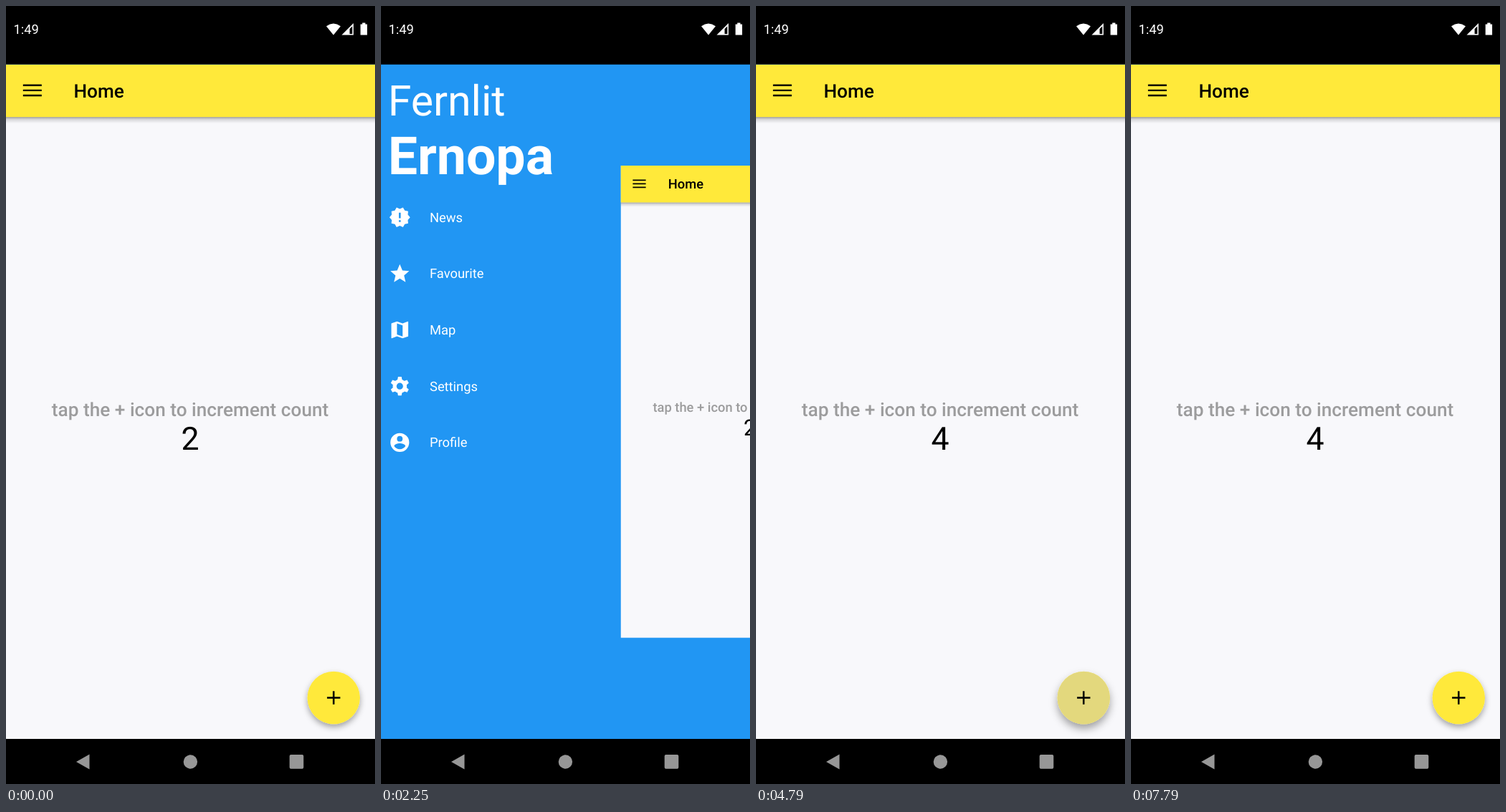
An HTML page that plays this animation: 515x1087 px, repeating every 7.96 s.

```html
<!DOCTYPE html>
<html lang="en">
<head>
<meta charset="utf-8">
<title>Drawer demo</title>
<style>
  html, body { margin: 0; width: 100%; height: 100%; overflow: hidden; background: #000; }
  svg { display: block; width: 100vw; height: 100vh; }
  text { font-family: Roboto, sans-serif; text-rendering: geometricPrecision; }
  .medium { font-weight: 500; font-size: 26.2px; }
  .small { font-size: 18.35px; fill: #fff; }
</style>
</head>
<body>
<svg viewBox="0 0 515 1087" xmlns="http://www.w3.org/2000/svg">
  <defs>
    <linearGradient id="barShade" x2="0" y2="1">
      <stop offset="0" stop-opacity=".36"/>
      <stop offset=".4" stop-opacity=".13"/>
      <stop offset="1" stop-opacity="0"/>
    </linearGradient>
    <filter id="lift" x="-40%" y="-40%" width="180%" height="190%">
      <feDropShadow id="shadow" dx="0" dy="4" stdDeviation="4" flood-opacity=".36"/>
    </filter>
    <clipPath id="screen"><rect y="81.7" width="515" height="942.3"/></clipPath>
    <clipPath id="barClip"><rect y="81.7" width="515" height="73.4"/></clipPath>
    <clipPath id="fabClip"><circle cx="457.3" cy="966.5" r="36.7"/></clipPath>
  </defs>

  <rect width="515" height="1087"/>

  <g id="status" fill="#fff">
    <text class="small" x="10.5" y="39.4">1:49</text>
    <path d="M447 28.2Q457 20.8 467 28.2L457 40.5Z"/>
    <path d="M485 24V40.5H468.5Z"/>
    <path d="M483.4 28.2V38.9H479.6V32Z" fill="#000"/>
    <path d="M497.3 23.6h4.2v1.8h2.6v15.2h-9.4v-15.2h2.6z"/>
  </g>

  <g clip-path="url(#screen)">
    <rect y="81" width="515" height="944" fill="#2196f3"/>
    <g id="menu" fill="#fff">
      <text x="9.7" y="152.6" font-size="59">Fernlit</text>
      <text x="9.7" y="235.2" font-size="73.4" font-weight="700">Ernopa</text>
    </g>

    <g id="panel">
      <rect y="81.7" width="515" height="942.3" fill="#f8f8fb"/>
      <rect y="155" width="515" height="9" fill="url(#barShade)"/>
      <rect y="81.7" width="515" height="73.4" fill="#ffe93a"/>
      <g clip-path="url(#barClip)">
        <circle id="menuGlow" cx="36.7" cy="118.2" r="45.9" fill="#bcbcbc"/>
        <circle id="menuSplash" cx="36.7" cy="118.2" fill="#c8c8c8"/>
      </g>
      <path d="M23.8 110.8h26M23.8 117.9h26M23.8 125h26" stroke="#000" stroke-width="2.4"/>
      <text class="medium" x="94.4" y="127.9">Home</text>
      <text class="medium" x="257" y="572.7" text-anchor="middle" fill="#9c9c9d">tap the + icon to increment count</text>
      <text id="count" x="257" y="620.2" text-anchor="middle" font-size="44.6">2</text>
      <circle cx="457.3" cy="966.5" r="36.7" fill="#ffe93a" filter="url(#lift)"/>
      <g clip-path="url(#fabClip)">
        <circle id="fabGlow" cx="457.3" cy="966.5" r="36.7" fill="#bcbcbc"/>
        <circle id="fabSplash" cx="457.3" cy="966.5" fill="#c8c8c8"/>
      </g>
      <path d="M448.1 966.5h18.4M457.3 957.3v18.4" stroke="#000" stroke-width="2.5"/>
    </g>
  </g>

  <g id="nav" fill="#979797">
    <path d="M98 1056L116.5 1045.5V1066.5Z"/>
    <circle cx="257.4" cy="1056" r="9.7"/>
    <rect x="395.7" y="1046" width="19.6" height="19.8" rx="2"/>
  </g>
</svg>

<script>
const LOOP = 7960, FRAME = 125 / 3, SLIDE = 300, FADE = 200;
const $ = id => document.getElementById(id);
const clamp = v => Math.max(0, Math.min(1, v));

const tooth = a => `<path d="M10.2 2h3.6l.8 4h-5.2z" transform="rotate(${a} 12 12)"/>`;
const items = [
  ['News', '<path d="M23 12l-2.44-2.78.34-3.68-3.61-.82-1.89-3.18L12 3 8.6 1.54 6.71 4.72l-3.61.81.34 3.68L1 12l2.44 2.78-.34 3.69 3.61.82 1.89 3.18L12 21l3.4 1.46 1.89-3.18 3.61-.82-.34-3.68zM13 17h-2v-2h2zm0-4h-2V7h2z" fill-rule="evenodd"/>'],
  ['Favourite', '<path d="M12 17.27L18.18 21l-1.64-7.03L22 9.24l-7.19-.61L12 2 9.19 8.63 2 9.24l5.46 4.73L5.82 21z"/>'],
  ['Map', '<path d="M20.5 3L15 5.1 9 3 3.36 4.9Q3 5 3 5.4V20.5Q3 21 3.5 21L9 18.9l6 2.1 5.64-1.9Q21 19 21 18.6V3.5Q21 3 20.5 3zM15 19l-6-2.11V5l6 2.11z" fill-rule="evenodd"/>'],
  ['Settings', '<circle cx="12" cy="12" r="5.5" fill="none" stroke="#fff" stroke-width="4"/>' + [0, 60, 120, 180, 240, 300].map(tooth).join('')],
  ['Profile', '<path d="M12 2a10 10 0 1 0 0 20a10 10 0 1 0 0-20zM12 5a3 3 0 1 1 0 6a3 3 0 1 1 0-6zM12 19.2c-2.5 0-4.71-1.28-6-3.22.03-1.99 4-3.08 6-3.08 1.99 0 5.97 1.09 6 3.08-1.29 1.94-3.5 3.22-6 3.22z" fill-rule="evenodd"/>'],
];
$('menu').innerHTML += items.map(([label, icon], i) => {
  const y = 295.2 + i * 78.66;
  return `<g transform="translate(10.5 ${y - 15.7}) scale(1.311)">${icon}</g>` +
    `<text class="small" x="68" y="${y + 6.4}">${label}</text>`;
}).join('');

// [press, release] times in ms
const menuTaps = [[1510, 1668], [3150, 3290], [5760, 5918], [6900, 7040]];
const fabTaps = [[4060, 4170], [4590, 4750]];

const latest = (taps, t) => taps.filter(([down]) => t >= down).pop();

// Strength of the held state: fades in on press and out from there on release.
function hold(tap, t) {
  if (!tap) return 0;
  const [down, up] = tap;
  const reached = clamp((Math.min(t, up) - down) / FADE);
  return Math.max(0, reached - Math.max(0, t - up) / FADE);
}

function ripple(name, tap, t, radius) {
  const held = hold(tap, t);
  let size = 0, alpha = 0;
  if (tap) {
    const [down, up] = tap;
    const start = clamp((Math.min(t, up) - down) / 1000);
    size = radius * Math.min(1, start + Math.max(0, t - up) / 36);
    alpha = 0.4 * (1 - clamp((t - up) / FADE));
  }
  $(name + 'Glow').setAttribute('fill-opacity', 0.4 * held);
  $(name + 'Splash').setAttribute('r', size);
  $(name + 'Splash').setAttribute('fill-opacity', alpha);
  return held;
}

function draw(t) {
  const open = menuTaps.reduce((sum, [, up], i) =>
    sum + (i % 2 ? -1 : 1) * clamp((t - up) / SLIDE), 0);
  const scale = 1 - 0.3 * open, mid = 552.85;
  $('panel').setAttribute('transform',
    `translate(${515 * 0.65 * open} ${mid * (1 - scale)}) scale(${scale})`);

  ripple('menu', latest(menuTaps, t), t, 45.9);
  const lift = ripple('fab', latest(fabTaps, t), t, 52);
  $('shadow').setAttribute('dy', 4 + 4 * lift);
  $('shadow').setAttribute('stdDeviation', 4 + 3 * lift);
  $('count').textContent = 2 + fabTaps.filter(([, up]) => t >= up).length;
}

const begin = performance.now();
function tick() {
  const t = (performance.now() - begin) % LOOP;
  draw(Math.floor((t + 5) / FRAME) * FRAME);
  requestAnimationFrame(tick);
}
tick();
</script>
</body>
</html>
```
